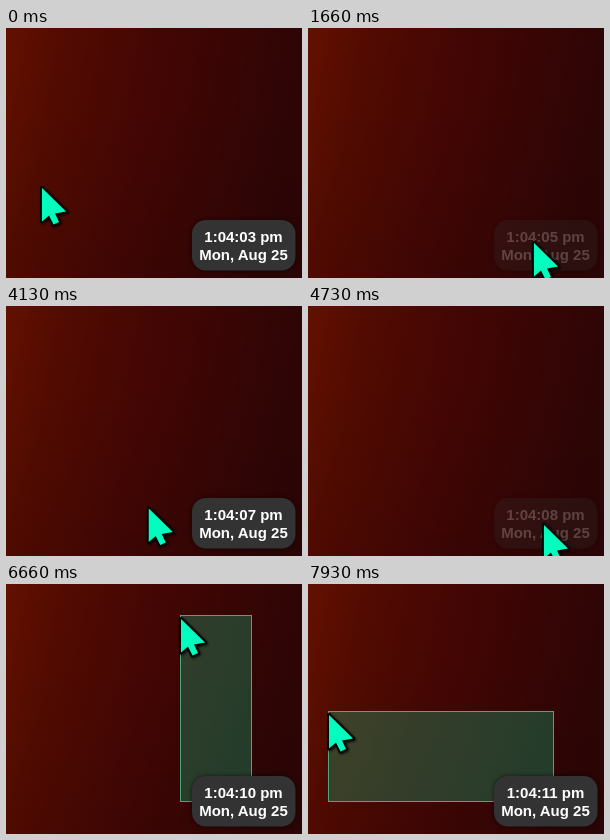
Animation, 296 px wide and 250 px high, one loop 8000 ms. Source, as an HTML page:

```html
<!DOCTYPE html>
<html lang="en">
<head>
<meta charset="utf-8">
<style>
  html, body { margin: 0; width: 100%; height: 100%; overflow: hidden; background: #400603; }
  svg { display: block; width: 296px; height: 250px; }
  text { font: bold 15px "Liberation Sans", Arial, sans-serif; fill: #fff; text-anchor: middle; }
  #clock rect { filter: drop-shadow(0 0 2px rgba(0, 0, 0, .6)); }
  #cursor { filter: drop-shadow(1px 1px 1px rgba(0, 0, 0, .8)); }
</style>
</head>
<body>
<svg viewBox="0 0 296 250">
  <defs>
    <linearGradient id="red" x1="0" y1="0" x2="1" y2=".16">
      <stop offset="0" stop-color="#621100"/>
      <stop offset=".2" stop-color="#520b01"/>
      <stop offset=".5" stop-color="#440604"/>
      <stop offset="1" stop-color="#2d0505"/>
    </linearGradient>
    <linearGradient id="shade" x1="0" y1="0" x2="0" y2="1">
      <stop offset=".3" stop-opacity="0"/>
      <stop offset="1" stop-opacity=".08"/>
    </linearGradient>
  </defs>
  <rect width="296" height="250" fill="url(#red)"/>
  <rect width="296" height="250" fill="url(#shade)"/>
  <rect id="selection" fill="rgba(0,240,170,.23)" stroke="rgba(80,200,150,.8)"/>
  <g id="clock">
    <rect x="186" y="192" width="103.5" height="50.5" rx="14" fill="#333"/>
    <text id="time" x="237.5" y="214"></text>
    <text x="237.5" y="232">Mon, Aug 25</text>
  </g>
  <path id="cursor" d="M1 4V37.5L8 31.5L12.5 40.5L18 38L14 29.5L25 27.5Z"
        fill="#00ffbf" stroke="#050808" stroke-width="4" stroke-linejoin="round" paint-order="stroke"/>
</svg>
<script>
const LOOP = 8000, STEP = 200 / 3, DRAG = 5400, ANCHOR = [245, 217];
const $ = id => document.getElementById(id);

// Each stroke is a smooth curve through points evenly spaced in time
const strokes = [
  { from: 0, to: 1660, points: [[35, 156], [155, 192], [190, 203], [233, 211], [225, 211]] },
  { from: 2700, to: 3267, points: [[225, 211], [163, 209], [134, 197]] },
  { from: 4067, to: 5067, points: [[134, 197], [190, 208], [235, 215], ANCHOR] },
  { from: DRAG, to: 8567, points: [ANCHOR, [195, 110], [174, 31], [85, 26], [20, 127], [100, 300]] }
];

const clamp = (v, lo = 0, hi = 1) => Math.max(lo, Math.min(hi, v));
const ramp = (t, start) => clamp((t - start) / 150);

// Catmull-Rom interpolation
function spline(a, b, c, d, u) {
  return b + u / 2 * (c - a + u * (2 * a - 5 * b + 4 * c - d + u * (3 * (b - c) + d - a)));
}

function pointer(t) {
  const { from, to, points } = strokes.findLast(s => t >= s.from);
  const last = points.length - 1;
  const pos = clamp((t - from) / (to - from)) * last;
  const i = Math.min(Math.floor(pos), last - 1);
  const near = [-1, 0, 1, 2].map(k => points[clamp(i + k, 0, last)]);
  return [0, 1].map(axis => spline(...near.map(p => p[axis]), pos - i));
}

function draw(now) {
  const t = Math.floor((now % LOOP + 8) / STEP) * STEP;
  const [x, y] = pointer(t);
  $("cursor").setAttribute("transform", `translate(${x} ${y})`);

  const hover = ramp(t, 600) - ramp(t, 2820) + ramp(t, 4400) - ramp(t, 5520);
  $("clock").setAttribute("opacity", 1 - .76 * hover);
  const second = 3 + Math.floor((t + 380) / 1000);
  $("time").textContent = `1:04:${String(second).padStart(2, "0")} pm`;

  const box = $("selection"), [ax, ay] = ANCHOR;
  const left = Math.round(Math.min(x, ax)), top = Math.round(Math.min(y, ay));
  box.style.display = t > DRAG ? "" : "none";
  box.setAttribute("x", left + .5);
  box.setAttribute("y", top + .5);
  box.setAttribute("width", ax - left);
  box.setAttribute("height", ay - top);
}

const start = performance.now();
function loop() {
  draw(performance.now() - start);
  requestAnimationFrame(loop);
}
loop();
</script>
</body>
</html>
```
